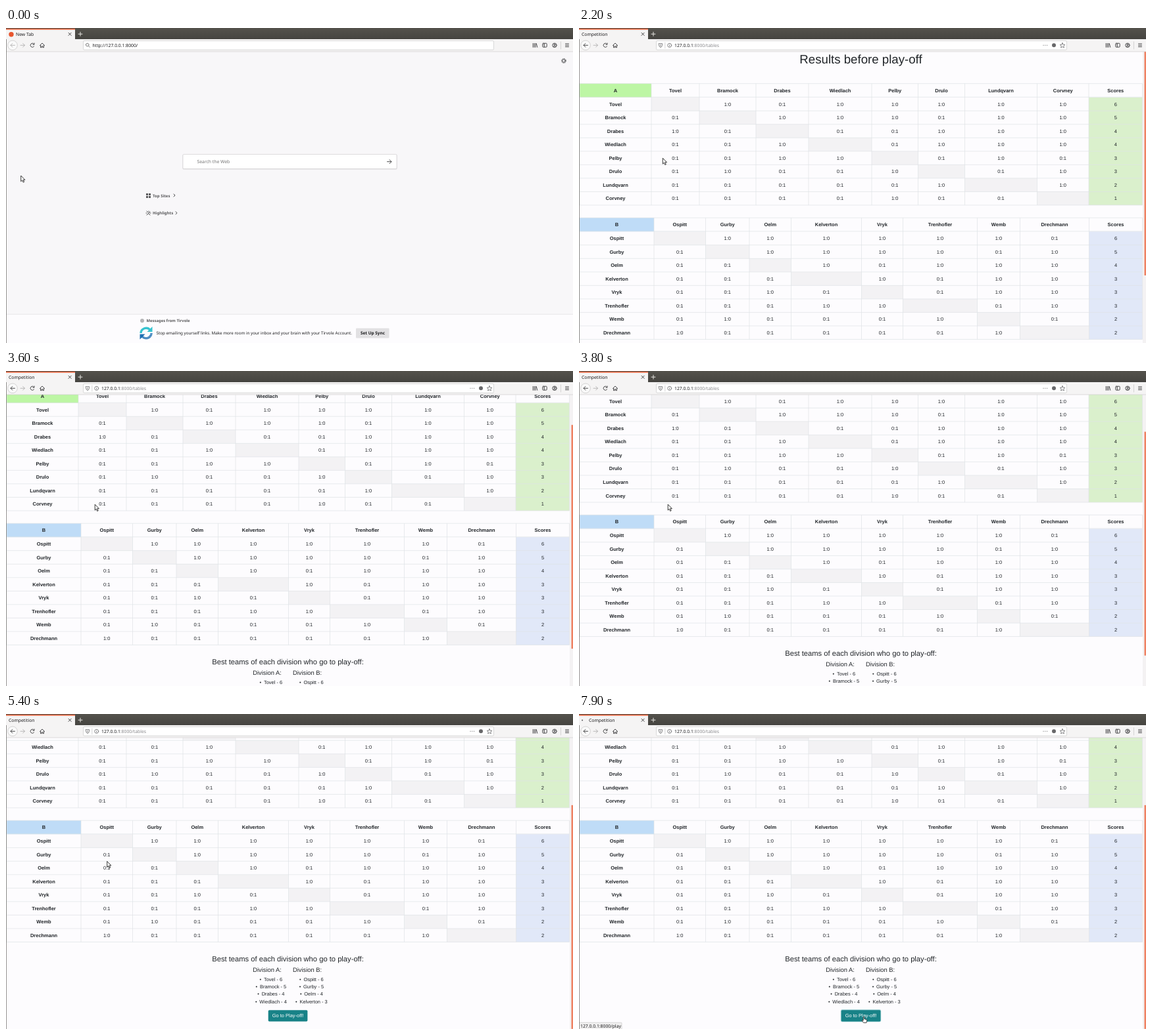
Write an HTML page that moves like this. It is 862x480 px and loops after 8000 ms.

```html
<!DOCTYPE html>
<html lang="en">
<head>
<meta charset="utf-8">
<title>Competition</title>
<style>
  html, body { margin: 0; width: 100%; height: 100%; overflow: hidden; }
  svg { display: block; width: 862px; height: 480px; text-rendering: geometricPrecision; }
  .ui { font: 6.8px "Noto Sans", "Open Sans", sans-serif; fill: #1c1c1e; }
  .page { font: 7.47px "Liberation Sans", Arial, sans-serif; fill: #212529; text-anchor: middle; }
  .bold { font-weight: bold; }
  .icon { fill: none; stroke: #4a4a4c; stroke-width: 1; stroke-linecap: round; stroke-linejoin: round; }
  .grid { fill: none; stroke: #dee2e6; stroke-width: .7; }
</style>
</head>
<body>
<svg viewBox="0 0 862 480">
  <defs>
    <linearGradient id="titlebar" x2="0" y2="1"><stop stop-color="#54524c"/><stop offset="1" stop-color="#454440"/></linearGradient>
    <clipPath id="view"><rect y="36" width="862" height="444"/></clipPath>
  </defs>
  <rect width="862" height="480" fill="#f8f7f9"/>

  <g id="newTab" class="ui">
    <g class="icon" stroke-width=".9">
      <circle cx="848" cy="50" r="2.2"/>
      <circle cx="848" cy="50" r="3.3" stroke-dasharray="1 1.59"/>
    </g>
    <rect x="268.5" y="192.5" width="326" height="23" rx="1.5" fill="#d9d8da"/>
    <rect x="269" y="192.5" width="325" height="22" rx="1.5" fill="#fff" stroke="#d0cfd1" stroke-width=".6"/>
    <text x="290.5" y="206.3" fill="#737373">Search the Web</text>
    <path class="icon" stroke="#777" d="M579.5 203.7h6.5m-3-3 3 3-3 3"/>
    <path fill="#5a5a5c" d="M213 252h3v3h-3zm4 0h3v3h-3zm-4 4h3v3h-3zm4 0h3v3h-3z"/>
    <path class="icon" d="m214 285 5-5m-5-1 2 2m1 2 2 2m-2-6v1m3 2h-1m-6 0h1"/>
    <g class="bold" font-size="6" fill="#5a5a5c" style="font-size:6px">
      <text x="223" y="257.6">Top Sites</text>
      <text x="223" y="284.4">Highlights</text>
      <path class="icon" d="m255 253 2 2-2 2m3 22.800 2 2-2 2"/>
    </g>
    <rect y="436" width="862" height="44" fill="#fdfcfe"/>
    <path d="M0 436.200h862" stroke="#dedde0" stroke-width=".7"/>
    <circle cx="207" cy="446" r="3" fill="#b4b4b6"/>
    <text x="213.500" y="448" class="bold" style="font-size:5.9px" fill="#5a5a5c">Messages from Tirvole</text>
    <g fill="none" stroke-width="3.400">
      <path d="M205 465a8 8 0 0 1 14-5" stroke="#35c3cf"/>
      <path d="M221 465a8 8 0 0 1-14 5" stroke="#1f6fb2" stroke-dasharray="1.5 .4"/>
    </g>
    <path d="M222.500 455v8h-8z" fill="#35c3cf"/><path d="M203.500 474.500v-8h8z" fill="#1f6fb2"/>
    <text x="228.500" y="467.200" style="font-size:6.260px">Stop emailing yourself links. Make more room in your inbox and your brain with your Tirvole Account.</text>
    <rect x="532" y="457.500" width="50.500" height="15" rx="1" fill="#e2e1e3"/>
    <text x="539" y="467.300" class="bold" style="font-size:6.400px">Set Up Sync</text>
  </g>

  <g id="results" clip-path="url(#view)">
    <rect y="36" width="862" height="444" fill="#fdfcfe"/>
    <g id="sheet" class="page"></g>
    <rect x="857" y="36" width="5" height="444" fill="#f4f2f3"/>
    <rect id="thumb" x="859.500" y="36" width="2.500" height="341" fill="#ee8263"/>
  </g>

  <g class="ui">
    <rect width="862" height="17" fill="url(#titlebar)"/>
    <rect y="17" width="862" height="19" fill="#f5f4f4"/>
    <path d="M0 36h862" stroke="#cfcdcd" stroke-width=".7"/>
    <rect y="1" width="105" height="17" fill="#f5f4f4"/>
    <rect y="1" width="105" height="1.600" fill="#e8663f"/>
    <circle id="favicon" cx="8" cy="9.700" r="3.700" fill="#e8562e"/>
    <circle id="dot" cy="9.500" r=".9" fill="#4a4a4c"/>
    <text id="title" y="11.600"></text>
    <path class="icon" d="m95 7.200 4.200 4.200m0-4.200L95 11.400"/>
    <path class="icon" style="stroke:#e6e4e0" d="M110 9.200h6m-3-3v6"/>

    <circle cx="10" cy="26.300" r="7.300" fill="#fafafa" stroke="#c4c3c3" stroke-width=".7"/>
    <path id="back" class="icon" d="M13.500 26.300H7m2.800-2.800L7 26.300l2.800 2.800"/>
    <path class="icon" style="stroke:#b8b7b7" d="M22 26.300h6.500m-2.800-2.800 2.800 2.800-2.800 2.800"/>
    <path id="reload" class="icon" d="M42.600 28a3 3 0 1 1-.2-3.700m.600-1.300v2.200h-2.200"/>
    <path id="stop" class="icon" d="m37.300 23.600 5.400 5.400m0-5.400-5.400 5.400"/>
    <path class="icon" d="m51.500 26.500 3.500-3.500 3.500 3.500m-6 0v3.200h1.700v-2h1.600v2h1.700v-3.200"/>

    <rect x="117.500" y="19.500" width="624" height="13.800" rx="1.500" fill="#fff" stroke="#cbcaca" stroke-width=".7"/>
    <g id="typing">
      <path class="icon" style="stroke:#777" stroke-width=".8" d="M125.300 27.300a2.300 2.300 0 1 1 .1-.1l2.100 2.100"/>
      <text id="typed" x="131.500" y="28.900"></text>
    </g>
    <g id="visited">
      <g class="icon" style="stroke:#68686a;stroke-width:.8">
        <path d="M121.500 23.700h5v2.500q0 2.300-2.500 3.500-2.500-1.200-2.500-3.500zM124 25v3"/>
        <path d="M130.800 22v9" stroke-opacity=".35"/>
        <circle cx="137.700" cy="26.400" r="3"/>
        <path d="M137.700 26.300v1.600m0-3.200v.1"/>
        <path d="m735 22.700 1.100 2.500 2.700.3-2 1.800.6 2.700-2.400-1.400-2.400 1.400.6-2.700-2-1.800 2.700-.3z"/>
      </g>
      <text x="145" y="28.900">127.0.0.1<tspan fill="#88888b">:8000/tables</tspan></text>
      <path class="icon" stroke-width="1.500" d="M706 26.300h.1m2.700 0h.1m2.700 0h.1"/>
      <circle cx="722" cy="26.300" r="3" fill="#68686a"/>
    </g>
    <g class="icon">
      <path d="M801.200 23.500v5.800m2-5.800v5.800m1.900-5.800v5.800m1.200-5.600 1.500 5.600"/>
      <rect x="815.800" y="23.300" width="6.400" height="5.800" rx="1"/><path d="M818.300 23.500v5.500m-1.300-3.700v.1"/>
      <circle cx="834" cy="26.300" r="3.200"/><circle cx="834" cy="25.500" r="1"/><path d="M832 28.300q2-1.500 4 0"/>
      <path d="M843.500 21v11" stroke-opacity=".2"/>
      <path d="M850.500 24h5m-5 2.300h5m-5 2.300h5"/>
    </g>
    <g id="status">
      <rect id="statusBox" x="-1" y="470.200" height="11" rx="1" fill="#f1f0f0" stroke="#c8c7c7" stroke-width=".7"/>
      <text id="statusText" x="2" y="477.700"></text>
    </g>
  </g>
  <path d="M.4 17v463" stroke="#6c6a68" stroke-width=".8"/>

  <g id="arrow"><path d="M0 0v8.800l2-1.800 1.500 3.200 1.500-.7-1.500-3.100h2.700z" fill="#fff" stroke="#222" stroke-width=".9" stroke-linejoin="round"/></g>
  <g id="hand"><path d="M-.8 0q.8-.8 1.600 0v3.200l3.300.9q.8.300.6 1.300L4 9H-.3l-2.600-3.600q.4-1 2.100.3z" fill="#fff" stroke="#222" stroke-width=".8" stroke-linejoin="round"/></g>
</svg>
<script>
const LOOP = 8000, MAX_SCROLL = 127;
const el = id => document.getElementById(id);
const show = (id, on) => el(id).style.display = on ? '' : 'none';
const move = (id, x, y) => el(id).setAttribute('transform', `translate(${x} ${y})`);
const clamp = v => Math.min(1, Math.max(0, v));
const easeOut = v => 1 - (1 - clamp(v)) ** 2;
const smooth = v => (v = clamp(v)) * v * (3 - 2 * v);

const rect = (x, y, w, h, fill) => `<rect x="${x}" y="${y}" width="${w}" height="${h}" fill="${fill}"/>`;
const text = (x, middle, value, size = 7.47, extra = '') =>
  `<text x="${x}" y="${middle + size * .36}" style="font-size:${size}px" ${extra}>${value}</text>`;

// Each row of results: 1 is a win, 0 a loss, - the team itself.
const divisions = [
  { name: 'A', top: 84.7, head: '#bdf6a4', tint: '#daf0cc',
    edges: [1, 110, 183, 269, 349, 445, 515.5, 586.5, 696.5, 775, 856.5],
    teams: ['Tovel', 'Bramock', 'Drabes', 'Wiedlach', 'Pelby', 'Drulo', 'Lundqvarn', 'Corvney'],
    results: ['-1011111', '0-111011', '10-00111', '001-0111', '0011-010', '01001-01', '000001-1', '0000100-'] },
  { name: 'B', top: 289.2, head: '#bfdcf7', tint: '#e1e8f8',
    edges: [1, 114, 192.5, 259, 322.5, 429.5, 492.5, 605.5, 670.5, 775.5, 856.5],
    teams: ['Ospitt', 'Gurby', 'Oelm', 'Kelverton', 'Vryk', 'Trenhofler', 'Wemb', 'Drechmann'],
    results: ['-1111110', '0-111101', '00-10111', '000-1011', '0010-011', '00011-01', '010001-0', '1000001-'] }
];
const HEAD = 21, ROW = 20.53;
const wins = row => row.split('1').length - 1;

function table({ name, top, head, tint, edges, teams, results }) {
  const body = top + HEAD, bottom = body + 8 * ROW;
  const center = i => (edges[i] + edges[i + 1]) / 2;
  const rowTop = i => body + i * ROW;
  let fills = rect(edges[0], top, edges[1] - edges[0], HEAD, head)
    + rect(edges[9], body, edges[10] - edges[9], 8 * ROW, tint);
  let labels = [name, ...teams, 'Scores']
    .map((label, i) => text(center(i), top + 10.4, label, 7.47, 'class="bold"')).join('');
  let lines = `M1 ${top}H856.5M1 ${body - .4}H856.5`;
  results.forEach((row, r) => {
    const middle = rowTop(r) + ROW / 2;
    labels += text(center(0), middle, teams[r], 7.47, 'class="bold"') + text(center(9), middle, wins(row));
    [...row].forEach((cell, c) => {
      if (cell === '-') fills += rect(edges[c + 1], rowTop(r), edges[c + 2] - edges[c + 1], ROW, '#f3f2f4');
      else labels += text(center(c + 1), middle, cell === '1' ? '1:0' : '0:1');
    });
    lines += `M1 ${rowTop(r + 1)}H856.5`;
  });
  edges.forEach(x => lines += `M${x} ${top}V${bottom}`);
  return `${fills}<path class="grid" d="${lines}"/>${labels}`;
}

function finalists({ name, teams, results }, headX, listX) {
  return text(headX, 516.5, `Division ${name}:`, 9.33) + teams.slice(0, 4)
    .map((team, i) => text(listX, 531.3 + i * 11.2, `•\u2002${team} - ${wins(results[i])}`)).join('');
}

el('sheet').innerHTML = text(428.5, 47, 'Results before play-off', 18.67)
  + divisions.map(table).join('')
  + text(428.5, 500, 'Best teams of each division who go to play-off:', 11.2)
  + finalists(divisions[0], 397, 402.9) + finalists(divisions[1], 458, 464.4)
  + '<rect id="ring" x="397.8" y="577.3" width="61.400" height="19" rx="2.300" fill="#9fd0d3"/>'
  + '<rect x="398.700" y="578.200" width="59.700" height="17.200" rx="1.600" fill="#188287"/>'
  + text(428.5, 586.8, 'Go to Play-off!', 7.47, 'fill="#fff"');

const cursorPath = [
  [1750, 22.7, 225], [2200, 127.3, 198.3], [2400, 127.3, 198.3], [2900, 135.2, 203.3],
  [5000, 135.2, 203.3], [5400, 153.7, 224.5], [6800, 433, 461.5]
];
function cursorAt(t) {
  const next = cursorPath.findIndex(key => key[0] > t);
  if (next === 0) return cursorPath[0].slice(1);
  if (next < 0) return cursorPath.at(-1).slice(1);
  const [t0, x0, y0] = cursorPath[next - 1], [t1, x1, y1] = cursorPath[next];
  const k = smooth((t - t0) / (t1 - t0));
  return [x0 + (x1 - x0) * k, y0 + (y1 - y0) * k];
}

// Three turns of the wheel; the last one reaches the end of the page.
const scrollAt = t => 57 * easeOut((t - 3260) / 300) + 57 * easeOut((t - 3765) / 300)
  + (MAX_SCROLL - 114) * easeOut((t - 4250) / 300);

function draw(t) {
  const committed = t >= 1100, loading = t >= 900 && t < 1800, leaving = t >= 7200;
  const busy = loading || leaving, hovering = t >= 6900;

  show('newTab', !committed);
  show('results', t >= 1600);
  show('favicon', t < 900);
  show('dot', busy);
  el('dot').setAttribute('cx', 8 + 4 * Math.cos((t - 1162) / 1200 * 2 * Math.PI));
  el('title').textContent = committed ? 'Competition' : 'New Tab';
  el('title').setAttribute('x', busy || !committed ? 15 : 4);

  show('typing', !committed);
  show('visited', committed);
  el('typed').textContent = 'http://127.0.0.1:8000/' + 'tables'.slice(0, Math.floor(t / 100) * 1.2);
  el('back').style.stroke = committed ? '' : '#b8b7b7';
  show('stop', loading);
  show('reload', !loading);

  show('status', hovering || (t >= 1000 && t < 1600));
  el('statusBox').setAttribute('width', hovering ? 66 : 152.5);
  el('statusText').textContent = hovering ? '127.0.0.1:8000/play'
    : `${committed ? 'Transferring data from' : 'Waiting for'} 127.0.0.1…`;

  const scroll = scrollAt(t);
  move('sheet', 0, -scroll);
  move('thumb', 0, scroll * .81);
  show('ring', leaving);

  const pointing = t >= 6800;
  show('arrow', !pointing);
  show('hand', pointing);
  move(pointing ? 'hand' : 'arrow', ...cursorAt(t));
}

function frame() {
  draw(performance.now() % LOOP);
  requestAnimationFrame(frame);
}
frame();
</script>
</body>
</html>
```
